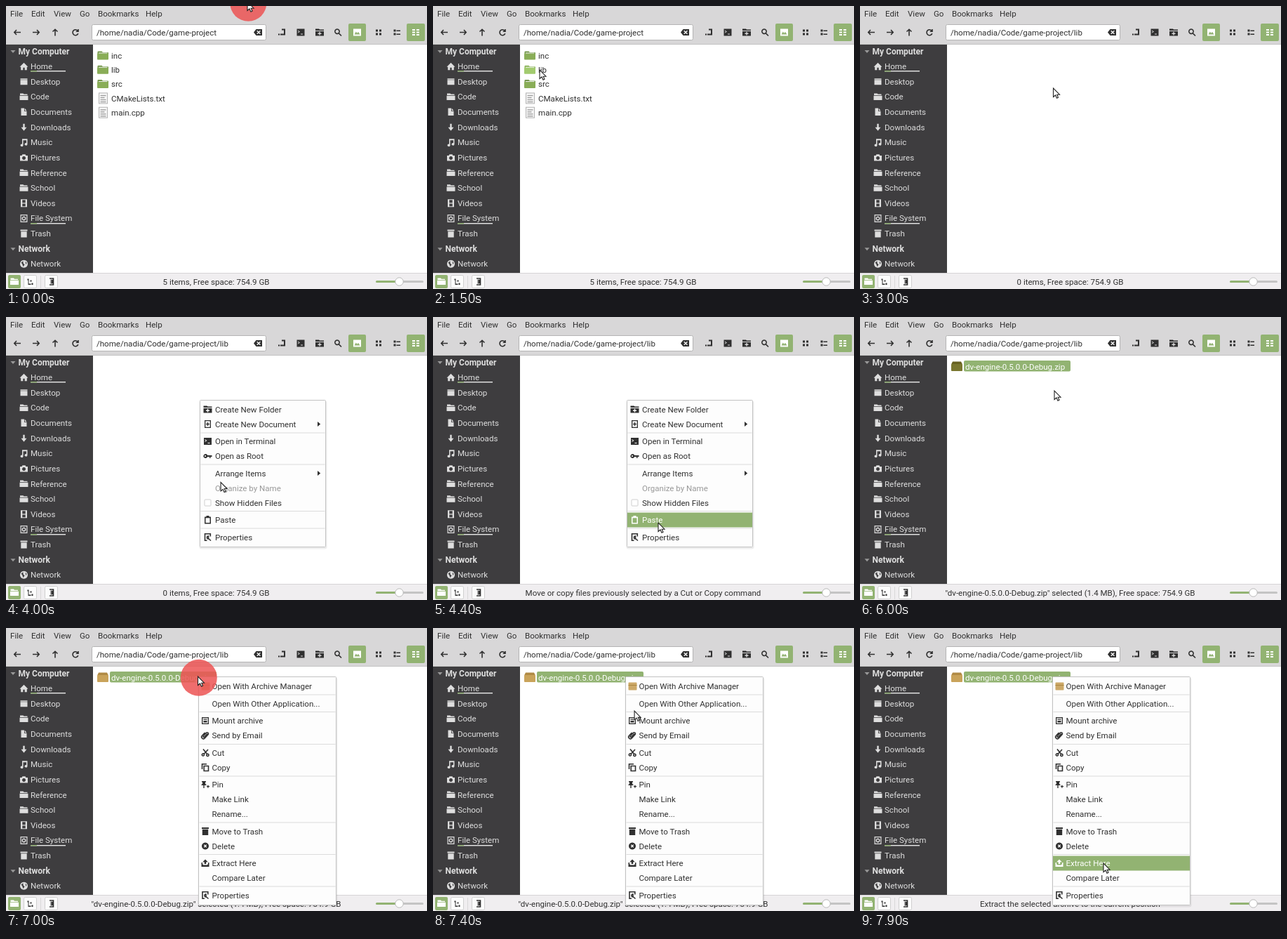
An HTML page for the animation above (8 s loop, 600 by 403 pixels).

```html
<!DOCTYPE html>
<html lang="en">
<head>
<meta charset="utf-8">
<title>File manager</title>
<style>
html, body { margin: 0; width: 100%; height: 100%; overflow: hidden; background: #fff; }
svg { display: block; width: 600px; height: 403px; font: 11.55px Roboto, "Open Sans", sans-serif; }
text { white-space: pre; }
</style>
</head>
<body>
<svg viewBox="0 0 600 403"><g id="base"></g><g id="live"></g></svg>
<script>
const INK = '#303030', GREEN = '#92b372', PALE = '#dedede';
const LOOP = 8000;

// Icon paths centred on 0,0; a leading ~ means stroked.
const icons = {
  left: '~M5 0H-4M-1-3.5L-4.2 0-1 3.5',
  right: '~M-5 0H4M1-3.5L4.2 0 1 3.5',
  up: '~M0 5V-4M-3.5-1L0-4.2 3.5-1',
  reload: '~M3.4-2A4 4 0 1 0 3.8 1.6M4-4.5V-1.2H.8',
  clear: 'M-6 0L-2.5-4.5H6V4.5H-2.5ZM-.8-2.7L-1.7-1.8 .2 0-1.7 1.8-.8 2.7 1.1 .9 3 2.7 3.9 1.8 2 0 3.9-1.8 3-2.7 1.1-.9Z',
  route: 'M-5 2H-3V4H-5ZM-2 2H3V-3H0V-5H5V4H-2Z',
  term: 'M-5.5-5H5.5V5H-5.5ZM-4-3V-2L-2.5-1-4 0V1L-1-1ZM0 2V3H3V2Z',
  newFolder: 'M-6-5H-1L0-4H6V-2.5H-6ZM-6-1.5H6V5H-6ZM-.7-.7V1H-2.5V2.4H-.7V4.1H.7V2.4H2.5V1H.7V-.7Z',
  search: '~M1.6 1.6L5 5M2.2-1.2A3.2 3.2 0 1 1 2.2-1.3Z',
  image: 'M-5.5-5H5.5V5H-5.5ZM-4 3H4L1.5-.7 0 1.2-1.7-1Z',
  grid: 'M-4-4H-1V-1H-4ZM1-4H4V-1H1ZM-4 1H-1V4H-4ZM1 1H4V4H1Z',
  list: 'M-5-4H-2V-1H-5ZM-1-3H4.5V-1.6H-1ZM-5 1H-2V4H-5ZM-1 2H4.5V3.4H-1Z',
  compact: 'M-5-4.5H-1V-2.5H-5ZM1-4.5H5V-2.5H1ZM-5-1H-1V1H-5ZM1-1H5V1H1ZM-5 2.5H-1V4.5H-5ZM1 2.5H5V4.5H1Z',
  home: 'M-6 .5L0-5.5 6 .5H4.3V5H1.2V1.5H-1.2V5H-4.3V.5Z',
  desktop: 'M-5-4.5H5V-3H-5ZM-5-2.4H5V4.5H-5Z',
  folder: 'M-5.5-5H-1L0-3.8H5V-2.5H-5.5ZM-6-1.7H6V4.5H-6Z',
  doc: 'M-4-5.5H.5V-1H4V5H-4ZM1.3-5.5L4-1.8H1.3Z',
  down: 'M-1.2-5H1.2V0H4L0 5-4 0H-1.2Z',
  music: 'M-2.5-5H5V2.5A2 1.8 0 1 1 3.5 .8V-3H-1V4A2 1.8 0 1 1-2.5 2.3Z',
  camera: 'M-5.5-3H-3L-2-4.7H2L3-3H5.5V4.5H-5.5ZM0-2A2.5 2.5 0 1 0 .01-2Z',
  film: 'M-4.5-5.5H4.5V5.5H-4.5ZM-2.2-4.5V-.6H2.2V-4.5ZM-2.2 .6V4.5H2.2V.6Z',
  disk: 'M-5-5.5H5V5.5H-5ZM-3.8-4.3V4.3H3.8V-4.3ZM0-3A3 3 0 1 0 .01-3ZM0-1.5A1.5 1.5 0 1 0 .01-1.5Z',
  trash: 'M-5-5.5H5V-3.6H-5ZM-4.2-2.8H4.2V5.5H-4.2Z',
  globe: 'M0-5.5A5.5 5.5 0 1 0 .01-5.5ZM-3.8-2L-1-4V-1L1 1-1 4-2 1ZM2-3.5L4-1.5 3 1Z',
  tree: 'M-4-4H-2V3H1V4.5H-3V-2H-4ZM0-2H2V0H0ZM2 2H4V4.5H2Z',
  side: '~M-2.5-4.5H3V4.5H-2.5M-1-2H1.5V2H-1M-1 0H1.5',
  newDoc: 'M-4.5-5.5H4.5V5.5H-4.5ZM-3.2-4.2V4.2H3.2V-4.2ZM-.7-2.5H.7V-.7H2.4V.7H.7V2.5H-.7V.7H-2.4V-.7H-.7Z',
  key: 'M-3-3A3 3 0 1 0-.3 1.1H2.5V3H4V1.1H6V-.9H-.2A3 3 0 0 0-3-3ZM-3.5-1A1 1 0 1 1-3.51-1Z',
  paste: 'M-4.5-4.5H-2V-6H2V-4.5H4.5V5.5H-4.5ZM-3-2.8V4H3V-2.8Z',
  props: '~M3.8-1V-4.8H-4V4.8H-1M1-1.5A2 2 0 1 0 1 2.5ZM1 2L4.5 5',
  mount: 'M-5-5H5V5H-5ZM-3.7-3.8V3.7H3.7V-3.8ZM-2.5-2.6H2.5V-1.3H-2.5ZM-2.5 0H2.5V2.6H-2.5Z',
  clip: '~M3-2.5L-1.3 2.3A1 1 0 0 1-2.7 .8L1.5-3.8A1.8 1.8 0 0 1 4.2-1.5L-.8 4A2.6 2.6 0 0 1-4.5 .3L-.5-4',
  cut: '~M-3-5L3 2.5M4-4.5L-2 2M-1.5 3A1.6 1.6 0 1 1-1.5 2.9M5 3.5A1.6 1.6 0 1 1 5 3.4',
  copy: '~M-1.8-2H4.5V5H-1.8ZM-4.5 2.5V-4.8H2',
  pin: 'M-5-5H1V-4L0-3V-1L1.5 0V1H-1.3V5H-2.7V1H-5.5V0L-4-1V-3L-5-4ZM2 2H3.3V.7H4.5V2H6V3.3H4.5V4.7H3.3V3.3H2Z',
  del: 'M0-5A5 5 0 1 0 .01-5ZM-2.2-1.3L-1.3-2.2 0-.9 1.3-2.2 2.2-1.3 .9 0 2.2 1.3 1.3 2.2 0 .9-1.3 2.2-2.2 1.3-.9 0Z',
  extract: 'M0-5.5L3.8-1.7H1.2V1H-1.2V-1.7H-3.8ZM-5.5-1H-4V.5L-3 2.5H3L4 .5V-1H5.5V5H-5.5Z',
  arrow: 'M-2-3.5L2.2 0-2 3.5Z',
  fold: 'M-3.5-2H3.5L0 2Z'
};

const rect = (x, y, w, h, fill, more = '') =>
  `<rect x="${x}" y="${y}" width="${w}" height="${h}" fill="${fill}" ${more}/>`;
const text = (x, y, s, fill = INK, more = '') =>
  `<text x="${x}" y="${y}" fill="${fill}" ${more}>${s}</text>`;
const icon = (name, x, y, fill = INK) => {
  const p = icons[name], at = `transform="translate(${x} ${y})"`;
  return p[0] === '~'
    ? `<path ${at} d="${p.slice(1)}" fill="none" stroke="${fill}" stroke-width="1.6"/>`
    : `<path ${at} d="${p}" fill="${fill}" fill-rule="evenodd"/>`;
};

function base() {
  let s = rect(0, 0, 600, 55, '#d8d7d8') + rect(0, 54, 600, 1, '#c3c3c3');
  [['File', 6], ['Edit', 36], ['View', 68], ['Go', 105], ['Bookmarks', 131], ['Help', 199]]
    .forEach(([label, x]) => s += text(x, 15, label));
  s += rect(122.5, 26.5, 248, 22, '#fff', 'stroke="#b4b4b4" rx="2"');
  s += rect(488, 25, 25, 25, GREEN, 'rx="2"') + rect(571, 25, 26, 25, GREEN, 'rx="2"');
  [['left', 16], ['right', 43], ['up', 70], ['reload', 99], ['clear', 359], ['route', 393], ['term', 420],
   ['newFolder', 447], ['search', 473], ['image', 500.5, '#fff'], ['grid', 531], ['list', 557.5],
   ['compact', 584, '#fff']].forEach(([n, x, c]) => s += icon(n, x, 37.5, c));

  s += rect(0, 55, 124, 326, '#3e3d3f');
  [['My Computer'], ['Home', 'home'], ['Desktop', 'desktop'], ['Code', 'folder'], ['Documents', 'doc'],
   ['Downloads', 'down'], ['Music', 'music'], ['Pictures', 'camera'], ['Reference', 'folder'],
   ['School', 'folder'], ['Videos', 'film'], ['File System', 'disk'], ['Trash', 'trash'],
   ['Network'], ['Network', 'globe']].forEach(([label, pic], i) => {
    const y = 64.5 + i * 21.63;
    s += pic
      ? icon(pic, 25.5, y, PALE) + text(35, y + 4, label, PALE)
      : icon('fold', 10, y + .5, '#999') + text(17.5, y + 4, label, PALE, 'font-weight="700" font-size="12"');
    if (pic === 'home' || pic === 'disk')
      s += rect(35, Math.round(y + 6.2), 50, 1.4, '#e8e8e8') + rect(35, Math.round(y + 6.2), 9, 1.4, GREEN);
  });

  s += rect(0, 380, 600, 23, '#f0eef0') + rect(0, 380, 600, 1, '#d6d4d6');
  s += rect(3, 383, 18, 19, GREEN, 'rx="2"') + icon('folder', 12, 392.5, '#fff');
  [[25, 'tree'], [55, 'side']].forEach(([x, n]) =>
    s += rect(x + .5, 383.5, 18, 18, '#fcfcfc', 'stroke="#cfcfcf" rx="2"') + icon(n, x + 9.5, 392.5));
  s += rect(49, 384, 1, 18, '#d8d8d8');
  s += rect(527, 391, 34, 3, GREEN, 'rx="1.5"') + rect(560, 391, 35, 3, '#c4c4c4', 'rx="1.5"');
  s += '<circle cx="560.5" cy="392.5" r="5.7" fill="#fff" stroke="#b8b8b8"/>';
  return s;
}

const folder = (y, lit) =>
  `<path d="M130.5 ${y - 5}q0-1 1-1h5l1.5 1.5h7q1 0 1 1v3h-15.5z" fill="${lit ? '#8bb55a' : '#73964a'}"/>` +
  rect(132, y - 4, 12.5, 3, '#f2f2f2') +
  rect(130, y - 3, 16, 9, lit ? '#a2cb6e' : '#89ad57', 'rx="1"');

const page = y =>
  rect(132.5, y - 7.5, 12, 15, '#f6f6f6', 'stroke="#b2b2b2"') +
  [-4, -1, 2, 5].map((d, i) => rect(134.5, y + d - .5, i === 1 ? 6 : 8, 1.3, '#9b9b9b')).join('');

const crate = (x, y, face, top) =>
  `<path d="M${x} ${y - 3}l2-4h12l2 4z" fill="${top}"/>` + rect(x, y - 3.5, 16, 10, face, 'rx="1"');

function project(cursor) {
  return ['inc', 'lib', 'src', 'CMakeLists.txt', 'main.cpp'].map((label, i) => {
    const y = 70.5 + i * 20.3;
    const lit = Math.abs(cursor.y - y) < 10 && cursor.x > 130 && cursor.x < 166;
    return (i < 3 ? folder(y, lit) : page(y)) + text(150, y + 4.3, label);
  }).join('');
}

const zip = 'dv-engine-0.5.0.0-Debug.zip';
const archive = lit =>
  (lit ? crate(130, 70.5, '#c9a35a', '#b08a44') : crate(130, 70.5, '#79762f', '#66601f')) +
  rect(148, 62, 152, 15.5, GREEN, 'rx="2"') + text(150, 74.5, zip, '#fff');

// Each item: row centre, label, icon.
const paneMenu = {
  x: 276.5, y: 118.5, w: 179, h: 209, seps: [165, 210, 276.5, 301],
  items: [[131.5, 'Create New Folder', 'newFolder'], [152.5, 'Create New Document', 'newDoc'],
    [177, 'Open in Terminal', 'term'], [198, 'Open as Root', 'key'], [222.5, 'Arrange Items'],
    [243.5, 'Organize by Name'], [264.5, 'Show Hidden Files', 'check'], [289, 'Paste', 'paste'],
    [313.5, 'Properties', 'props']]
};
const fileMenu = {
  x: 274.5, y: 69.5, w: 196, h: 325, seps: [95, 119.5, 165.5, 211, 277, 322.5, 368],
  items: [[83, 'Open With Archive Manager', 'crate'], [107.5, 'Open With Other Application...'],
    [132, 'Mount archive', 'mount'], [153, 'Send by Email', 'clip'], [177.5, 'Cut', 'cut'],
    [198.5, 'Copy', 'copy'], [223, 'Pin', 'pin'], [244, 'Make Link'], [265, 'Rename...'],
    [289.5, 'Move to Trash', 'trash'], [310.5, 'Delete', 'del'], [335, 'Extract Here', 'extract'],
    [356, 'Compare Later'], [380.5, 'Properties', 'props']]
};

const hovered = (menu, c) => menu && c.x > menu.x &&
  menu.items.find(([y, label]) => Math.abs(c.y - y) < 10.5 && label !== 'Organize by Name');

function drawMenu(menu, hot) {
  const { x, y, w, h } = menu, left = x + (menu === paneMenu ? 21.5 : 19), ix = left - 9.5 - (menu === paneMenu ? 1 : 0);
  let s = rect(x - 1, y + 1, w + 3, h + 2, '#000', 'opacity=".07" rx="3"') +
    rect(x, y, w, h, '#fdfdfd', 'stroke="#c2c2c2" rx="1"');
  menu.seps.forEach(v => s += rect(x + 1, v - .5, w - 2, 1, '#dcdcdc'));
  menu.items.forEach(item => {
    const [v, label, pic] = item;
    const c = item === hot ? '#fff' : label === 'Organize by Name' ? '#999' : INK;
    if (item === hot) s += rect(x + .5, v - 10.5, w - 1, 21, GREEN);
    if (pic === 'check') s += rect(ix - 4.5, v - 4.5, 9, 9, '#fff', 'stroke="#cfcfcf" rx="1"');
    else if (pic === 'crate') s += rect(ix - 5.5, v - 5.5, 12, 11, '#cda968', 'rx="1"') +
      rect(ix - 5.5, v - 2, 12, 1, '#a9853f');
    else if (pic) s += icon(pic, ix, v, c);
    if (label === 'Create New Document' || label === 'Arrange Items') s += icon('arrow', 446, v, c);
    s += text(left, v + 4, label, c);
  });
  return s;
}

// Cursor stops: time, x, y.
const stops = [[0, 344, -6], [200, 344, -6], [950, 272, 131], [1450, 152, 91], [2250, 152, 91],
  [2850, 275.5, 117], [3600, 275.5, 117], [4250, 321, 293], [5000, 321, 293], [5850, 277, 105],
  [6350, 277, 105], [6700, 273.5, 69], [7250, 273.5, 69], [7800, 347, 335], [LOOP, 347, 335]];
const clicks = [[0, 200], [1850, 2200], [3100, 3450], [4600, 4900], [6750, 7200]];

function cursorAt(t) {
  const i = stops.findIndex(s => s[0] > t);
  const [t0, x0, y0] = stops[i - 1], [t1, x1, y1] = stops[i];
  const u = (t - t0) / (t1 - t0), k = u * u * (3 - 2 * u);
  return { x: x0 + (x1 - x0) * k, y: y0 + (y1 - y0) * k };
}

function scene(t) {
  const c = cursorAt(t), inLib = t >= 2100, pasted = t >= 4800;
  const menu = t >= 3200 && t < 4800 ? paneMenu : t >= 6900 ? fileMenu : null;
  const hot = hovered(menu, c), label = hot && hot[1];
  const status = label === 'Paste' ? 'Move or copy files previously selected by a Cut or Copy command'
    : label === 'Extract Here' ? 'Extract the selected archive to the current position'
    : pasted ? `"${zip}" selected (1.4 MB), Free space: 754.9 GB`
    : `${inLib ? 0 : 5} items, Free space: 754.9 GB`;

  let s = text(129, 41.5, '/home/nadia/Code/game-project' + (inLib ? '/lib' : ''));
  s += text(299.5, 396.5, status, INK, 'text-anchor="middle"');
  if (!inLib) s += project(c);
  if (pasted) s += archive(t >= 6550);
  if (menu) s += drawMenu(menu, hot);
  if (clicks.some(([a, b]) => t >= a && t < b))
    s += `<circle cx="${c.x + 1.3}" cy="${c.y + 1.8}" r="26" fill="#ed5555" opacity=".86"/>`;
  return s + `<path transform="translate(${c.x} ${c.y})" d="M0 0V12.5L3 10 5 14.3 7 13.3 5.2 9.2H9Z" fill="#fff" stroke="#222" stroke-width="1.1"/>`;
}

const live = document.getElementById('live');
document.getElementById('base').innerHTML = base();
function tick() {
  live.innerHTML = scene(performance.now() % LOOP);
  requestAnimationFrame(tick);
}
tick();
</script>
</body>
</html>
```
